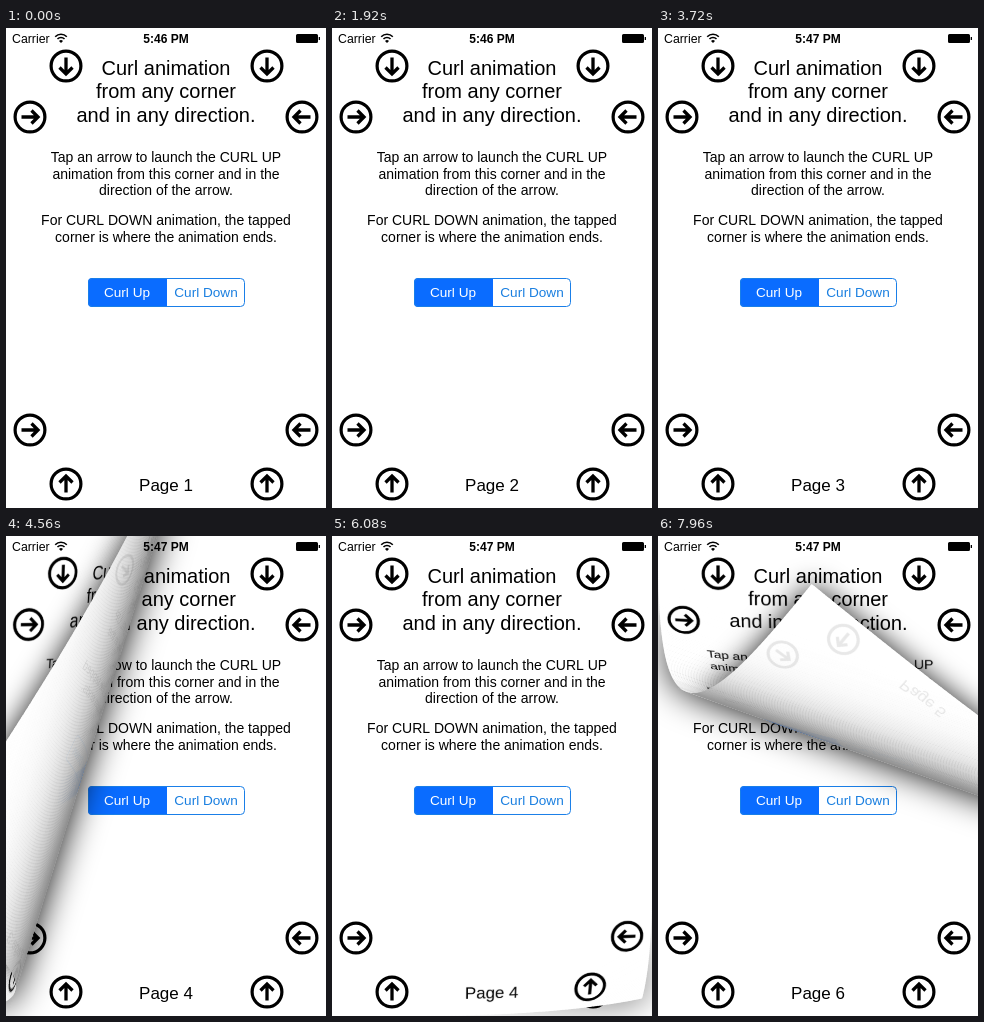
An HTML page with a canvas for the animation above (8000 ms loop, 320 px wide and 480 px high).

```html
<!DOCTYPE html>
<html lang="en">
<head>
<meta charset="utf-8">
<title>Curl animation</title>
<style>
html, body { margin: 0; width: 100%; height: 100%; overflow: hidden; background: #fff; }
canvas { display: block; width: 320px; height: 480px; }
</style>
</head>
<body>
<canvas id="stage"></canvas>
<script>
const W = 320, H = 480, LOOP = 8000;
const RADIUS = 150, HALF = Math.PI * RADIUS, CREST = HALF / 2;
const CURL_MS = 1000, CLOCK_MS = 2200, PAD = 80;
const FONT = '"Liberation Sans", Arial, sans-serif';
const BLUE = '#0a6cff';

// Each curl leaves from the side at angle base, tilted towards a corner.
const CURLS = [
  { start: 559, page: 1, base: -90, tilt: 1 },
  { start: 2216, page: 2, base: 0, tilt: -1 },
  { start: 3901, page: 3, base: 0, tilt: 1 },
  { start: 5775, page: 4, base: 90, tilt: -1 },
  { start: 7369, page: 5, base: 90, tilt: 1 }
];

// x, y and quarter turns clockwise from pointing right
const ARROWS = [
  [24, 89, 0], [60, 38, 1], [261, 38, 1], [296, 89, 2],
  [24, 402, 0], [60, 456, 3], [261, 456, 3], [296, 402, 2]
];

const TEXT = [
  [20, 47, 'Curl animation'],
  [20, 70, 'from any corner'],
  [20, 94, 'and in any direction.'],
  [14, 134, 'Tap an arrow to launch the CURL UP'],
  [14, 151, 'animation from this corner and in the'],
  [14, 167, 'direction of the arrow.'],
  [14, 197, 'For CURL DOWN animation, the tapped'],
  [14, 214, 'corner is where the animation ends.']
];

const dpr = window.devicePixelRatio || 1;

function makeCanvas(w, h, scale) {
  const c = document.createElement('canvas');
  c.width = w * scale;
  c.height = h * scale;
  c.getContext('2d').scale(scale, scale);
  return c;
}

const stage = document.getElementById('stage');
stage.width = W * dpr;
stage.height = H * dpr;
const ctx = stage.getContext('2d');
ctx.scale(dpr, dpr);
ctx.imageSmoothingQuality = 'high';

const shade = makeCanvas(W + 2 * PAD, H + 2 * PAD, 1);
const shadeCtx = shade.getContext('2d');

function label(g, text, x, y, size, color = '#000', align = 'center', weight = '') {
  g.font = `${weight} ${size}px ${FONT}`;
  g.textAlign = align;
  g.fillStyle = color;
  g.fillText(text, x, y);
}

function drawArrow(g, x, y, turns) {
  g.save();
  g.translate(x, y);
  g.rotate(turns * Math.PI / 2);
  g.strokeStyle = '#000';
  g.lineWidth = 3.2;
  g.beginPath();
  g.arc(0, 0, 14.9, 0, 7);
  g.stroke();
  g.lineWidth = 3.3;
  g.beginPath();
  g.moveTo(-8.5, 0);
  g.lineTo(7, 0);
  g.moveTo(1.5, -6.5);
  g.lineTo(8, 0);
  g.lineTo(1.5, 6.5);
  g.stroke();
  g.restore();
}

function drawSwitch(g) {
  g.fillStyle = BLUE;
  g.beginPath();
  g.roundRect(82, 250, 79, 29, [4, 0, 0, 4]);
  g.fill();
  g.strokeStyle = '#1a7fe8';
  g.lineWidth = 1;
  g.beginPath();
  g.roundRect(82.5, 250.5, 156, 28, 4);
  g.stroke();
  label(g, 'Curl Up', 121, 269, 13.6, '#fff');
  label(g, 'Curl Down', 200, 269, 13.6, '#1a7fe0');
}

function drawPage(g, n) {
  g.fillStyle = '#fff';
  g.fillRect(0, 0, W, H);
  for (const [size, y, text] of TEXT) label(g, text, W / 2, y, size);
  drawSwitch(g);
  for (const a of ARROWS) drawArrow(g, ...a);
  label(g, 'Page ' + n, W / 2, 463, 17);
}

const images = {};
function pageImage(n) {
  if (!images[n]) {
    images[n] = makeCanvas(W, H, 2);
    drawPage(images[n].getContext('2d'), n);
  }
  return images[n];
}

function drawStatus(g, t) {
  label(g, 'Carrier', 6, 15, 12.3, '#000', 'left');
  label(g, t < CLOCK_MS ? '5:46 PM' : '5:47 PM', W / 2, 15, 12, '#000', 'center', 'bold');
  g.strokeStyle = '#000';
  g.lineWidth = 1.6;
  for (const r of [5, 8.2]) {
    g.beginPath();
    g.arc(55, 14.5, r, -Math.PI * 0.75, -Math.PI * 0.25);
    g.stroke();
  }
  g.beginPath();
  g.moveTo(55, 15);
  g.arc(55, 15, 2.8, -Math.PI * 0.75, -Math.PI * 0.25);
  g.fill();
  g.beginPath();
  g.roundRect(290, 6, 22, 9, 1.5);
  g.rect(312.7, 9, 1.3, 3);
  g.fill();
}

// Cubic bezier (.42, 0, .58, 1)
function ease(p) {
  let lo = 0, hi = 1;
  for (let i = 0; i < 24; i++) {
    const m = (lo + hi) / 2, q = 1 - m;
    if (3 * q * q * m * 0.42 + 3 * q * m * m * 0.58 + m * m * m < p) lo = m;
    else hi = m;
  }
  return lo * lo * (3 - 2 * lo);
}

// Distances run from the corner opposite the lifted one; the tilt eases off.
function pose(curl, progress) {
  const tilt = curl.tilt * (34 - 22 * progress);
  const angle = (curl.base + tilt) * Math.PI / 180;
  const dx = Math.cos(angle), dy = Math.sin(angle);
  const length = Math.abs(dx) * W + Math.abs(dy) * H;
  return {
    angle, length,
    page: curl.page,
    ox: dx > 0 ? 0 : W,
    oy: dy > 0 ? 0 : H,
    fold: length - progress * (length + RADIUS)
  };
}

// Distance along the sheet past the fold -> projected distance
const project = s => s < HALF ? RADIUS * Math.sin(s / RADIUS) : HALF - s;

function enter(g, c) {
  g.translate(c.ox, c.oy);
  g.rotate(c.angle);
}

function leave(g, c) {
  g.rotate(-c.angle);
  g.translate(-c.ox, -c.oy);
}

function clipBand(g, from, to) {
  g.beginPath();
  g.rect(from, -900, to - from, 1800);
  g.clip();
}

// Calls paint(theta) in page coordinates for each thin strip of the sheet.
function eachStrip(g, c, from, to, step, overlap, paint) {
  const first = Math.max(from, -c.fold), last = Math.min(to, c.length - c.fold);
  for (let s = first; s < last; s += step) {
    const end = Math.min(s + step, last);
    const x = project(s);
    let k = (project(end) - x) / (end - s);
    if (Math.abs(k) < 1e-3) k = k < 0 ? -1e-3 : 1e-3;
    g.save();
    enter(g, c);
    g.translate(c.fold + x, 0);
    g.scale(k, 1);
    g.translate(-c.fold - s, 0);
    clipBand(g, c.fold + s - overlap, c.fold + end);
    leave(g, c);
    paint(Math.min((s + end) / 2 / RADIUS, Math.PI));
    g.restore();
  }
}

function drawShadow(c, from, blur, alpha) {
  shadeCtx.clearRect(0, 0, W + 2 * PAD, H + 2 * PAD);
  shadeCtx.save();
  shadeCtx.translate(PAD, PAD);
  eachStrip(shadeCtx, c, from, Infinity, 4, 0, theta => {
    shadeCtx.fillStyle = `rgba(0,0,0,${Math.min(1, 2 * (1 - Math.cos(theta)))})`;
    shadeCtx.fillRect(0, 0, W, H);
  });
  shadeCtx.restore();
  ctx.save();
  ctx.globalAlpha = alpha;
  ctx.filter = `blur(${blur * dpr}px)`;
  ctx.drawImage(shade, -PAD, -PAD);
  ctx.restore();
}

// Paints with everything past the given distance cut off.
function within(c, limit, paint) {
  ctx.save();
  enter(ctx, c);
  clipBand(ctx, -900, limit);
  leave(ctx, c);
  paint();
  ctx.restore();
}

function drawFront(c) {
  const img = pageImage(c.page);
  eachStrip(ctx, c, 0, CREST, 2, 1, () => ctx.drawImage(img, 0, 0, W, H));
}

function drawBack(c) {
  const img = pageImage(c.page);
  eachStrip(ctx, c, CREST, Infinity, 2, 1, theta => {
    const v = Math.round(255 * (1 - 0.45 * Math.sin(theta) ** 7));
    ctx.fillStyle = `rgb(${v},${v},${v})`;
    ctx.fillRect(0, 0, W, H);
    ctx.globalCompositeOperation = 'multiply';
    ctx.globalAlpha = 0.09;
    ctx.drawImage(img, 0, 0, W, H);
  });
}

function drawCurl(c) {
  drawPage(ctx, c.page + 1);
  drawShadow(c, 0, 17, 1);
  within(c, c.fold + 0.5, () => drawPage(ctx, c.page));
  drawFront(c);
  within(c, c.fold + RADIUS, () => drawShadow(c, CREST, 14, 0.9));
  drawBack(c);
}

function render(t) {
  const started = CURLS.filter(c => t >= c.start);
  const curl = started[started.length - 1];
  const p = curl ? (t - curl.start) / CURL_MS : 1;
  if (p < 1) drawCurl(pose(curl, ease(p)));
  else drawPage(ctx, started.length + 1);
  drawStatus(ctx, t);
}

const begin = performance.now();
function tick() {
  render((performance.now() - begin) % LOOP);
  requestAnimationFrame(tick);
}
tick();
</script>
</body>
</html>
```
